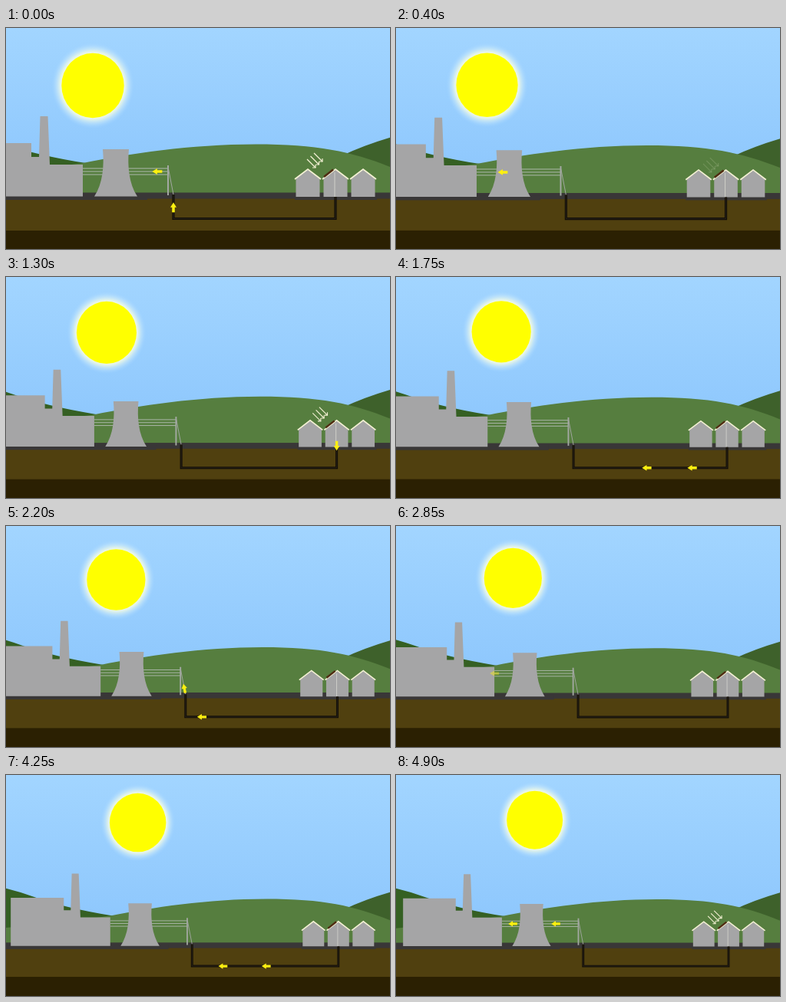
Write an HTML page with a canvas that moves like this. It is 500 by 288 pixels and loops after 4950 ms.

```html
<!DOCTYPE html>
<html lang="en">
<head>
<meta charset="utf-8">
<title>Solar feed-in</title>
<style>
html, body { margin: 0; width: 100%; height: 100%; overflow: hidden; background: #97cdff; }
canvas { display: block; width: 500px; height: 288px; }
</style>
</head>
<body>
<canvas id="stage" width="500" height="288"></canvas>
<script>
const ctx = document.getElementById('stage').getContext('2d');
const LOOP = 4950, STEP = 50;
const PIVOT = { x: 468, y: 254 };
const GREY = '#a5a5a6', YELLOW = '#fdf010', CREAM = '#f4f1d4', ROAD = '#393737';

// Cable route from the solar roof to the power station.
const ROUTE = [[429, 195], [429, 248.5], [218, 248.5], [218, 217], [212, 187], [100, 187]];

// Two arrows leave the roof on every trip; a payout follows each trip.
const TRIP = { first: -1.06, every: 2.32, gap: 0.2, wait: 0.15, from: 11, speed: 312, payout: 1.62 };
const RAY_PERIOD = TRIP.every / 2 + 0.015;

const clamp = v => Math.min(1, Math.max(0, v));

function line(points, colour, width) {
  ctx.beginPath();
  points.forEach(([x, y]) => ctx.lineTo(x, y));
  ctx.strokeStyle = colour;
  ctx.lineWidth = width;
  ctx.stroke();
}

function shape(d, fill) {
  ctx.fillStyle = fill;
  ctx.fill(new Path2D(d));
}

function rect(x1, y1, x2, y2, fill) {
  ctx.fillStyle = fill;
  ctx.fillRect(x1, y1, x2 - x1, y2 - y1);
}

function sky() {
  const g = ctx.createLinearGradient(0, 0, 0, 180);
  g.addColorStop(0, '#a2d5ff');
  g.addColorStop(1, '#8fc8fd');
  rect(0, 0, 500, 288, g);
}

function disc(r, fill) {
  ctx.fillStyle = fill;
  ctx.beginPath();
  ctx.arc(0, 0, r, 0, 7);
  ctx.fill();
}

function sun(x, y) {
  const g = ctx.createRadialGradient(0, 0, 38, 0, 0, 54);
  g.addColorStop(0, 'rgba(255,255,225,1)');
  g.addColorStop(0.3, 'rgba(240,250,230,.8)');
  g.addColorStop(0.65, 'rgba(205,235,250,.4)');
  g.addColorStop(1, 'rgba(165,213,255,0)');
  ctx.save();
  ctx.translate(x, y);
  ctx.scale(1, 1.04);
  disc(54, g);
  disc(40.7, '#ffff00');
  ctx.restore();
}

function land() {
  shape('M-70 132Q-40 138-12 148Q35 165 104 176V216H-70Z', '#356023');
  shape('M436 167Q470 151 510 140V216H436Z', '#3e612b');
  shape('M-70 195Q30 186 100 176C160 164 240 151.5 325 151.5C410 151.5 455 162 510 185V218H-70Z', '#567e3f');
  rect(-70, 220, 520, 300, '#50400f');
  rect(-70, 264, 520, 300, '#2b2002');
  rect(-70, 214.5, 520, 222.5, ROAD);
  rect(-70, 218, 184, 224, ROAD);
  rect(376, 218, 483, 224, ROAD);
}

function station() {
  for (let y = 183; y <= 191; y += 4) line([[100, y], [211, y]], '#aeb9ad', 1);
  line([[211, 179], [211, 218]], '#a3a8a2', 2);
  line([[211, 181], [218, 217]], '#a3a8a2', 1);
  shape('M-43.5 219.5V150H33V168H43L44.5 115H54.5L57 178H100V219.5Z', GREY);
  shape('M126 158H160C158 180 160 203 171 219.5H115C126 203 128 180 126 158Z', GREY);
}

function houses() {
  for (let x = 393; x <= 465; x += 36) {
    shape(`M${x - 15.5} 220v-24l15.5-12l15.5 12v24Z`, GREY);
    line([[x - 17, 197], [x, 184], [x + 17, 197]], CREAM, 1.7);
  }
  line([[414, 194], [426, 184.5]], '#4f2b12', 2.5);
}

function cable() {
  line([[428, 188], [428, 220]], '#d0d0ca', 1);
  const buried = [[429, 220], ...ROUTE.slice(1, 4)];
  line(buried, '#120e08', 3.2);
  line(buried, '#332b1c', 0.7);
}

function along(dist) {
  for (let i = 1; i < ROUTE.length; i++) {
    const [ax, ay] = ROUTE[i - 1], [bx, by] = ROUTE[i];
    const len = Math.hypot(bx - ax, by - ay);
    if (dist <= len || i === ROUTE.length - 1) {
      const k = Math.min(1, dist / len);
      return { x: ax + (bx - ax) * k, y: ay + (by - ay) * k, turn: Math.atan2(by - ay, bx - ax) };
    }
    dist -= len;
  }
}

function arrow(age) {
  if (age < -TRIP.wait) return;
  const dist = TRIP.from + TRIP.speed * Math.max(0, age);
  const p = along(dist);
  ctx.save();
  ctx.globalAlpha = clamp((450 - dist) / 12);
  ctx.translate(p.x, p.y);
  ctx.rotate(p.turn);
  shape('M-6.5-1.8H0V-4L6.5 0L0 4V1.8H-6.5Z', YELLOW);
  ctx.restore();
}

function payout(age) {
  const k = age / 0.55;
  if (k < 0 || k > 1) return;
  ctx.save();
  ctx.globalAlpha = clamp(k * 5) * clamp((1 - k) * 4);
  ctx.font = 'bold 22px "Liberation Mono", monospace';
  ctx.textAlign = 'center';
  ctx.lineWidth = 1;
  ctx.strokeStyle = 'rgba(90,100,20,.6)';
  ctx.fillStyle = '#f7f01c';
  const y = 186 - 12 * k;
  ctx.strokeText('+£', 436.5, y);
  ctx.fillText('+£', 436.5, y);
  ctx.restore();
}

function trips(t) {
  for (let leave = TRIP.first; leave < LOOP / 1000; leave += TRIP.every) {
    arrow(t - leave);
    arrow(t - leave - TRIP.gap);
    payout(t - leave - TRIP.payout);
  }
}

function rays(t) {
  const phase = (t + 0.1) % RAY_PERIOD - 0.1;
  if (phase > 0.42) return;
  const shift = 35 * Math.min(phase, 0.2);
  ctx.save();
  ctx.globalAlpha = clamp((phase + 0.15) / 0.1) * clamp((0.42 - phase) / 0.12);
  ctx.translate(402 + shift, 172.5 + shift * 0.7);
  for (let k = -1; k <= 1; k++) {
    const x = k * 4.5, y = -k * 4;
    line([[x - 5.5, y - 5.5], [x + 5.5, y + 5.5]], CREAM, 1.2);
    line([[x + 1.5, y + 5.5], [x + 5.5, y + 5.5], [x + 5.5, y + 1.5]], CREAM, 1.2);
  }
  ctx.restore();
}

function draw(t) {
  const zoom = 1 - 0.03484 * t + 0.00282 * t * t;
  sky();
  ctx.save();
  ctx.translate(PIVOT.x, PIVOT.y);
  ctx.scale(zoom, zoom);
  ctx.translate(-PIVOT.x, -PIVOT.y);
  sun(PIVOT.x - (PIVOT.x - 113 - 13.8 * t) / zoom, 75 - 7.9 * t);
  land();
  station();
  houses();
  cable();
  rays(t);
  trips(t);
  ctx.restore();
}

const begin = performance.now();
function tick() {
  const ms = (performance.now() - begin) % LOOP;
  draw(Math.floor(ms / STEP) * STEP / 1000);
  requestAnimationFrame(tick);
}
tick();
</script>
</body>
</html>
```
